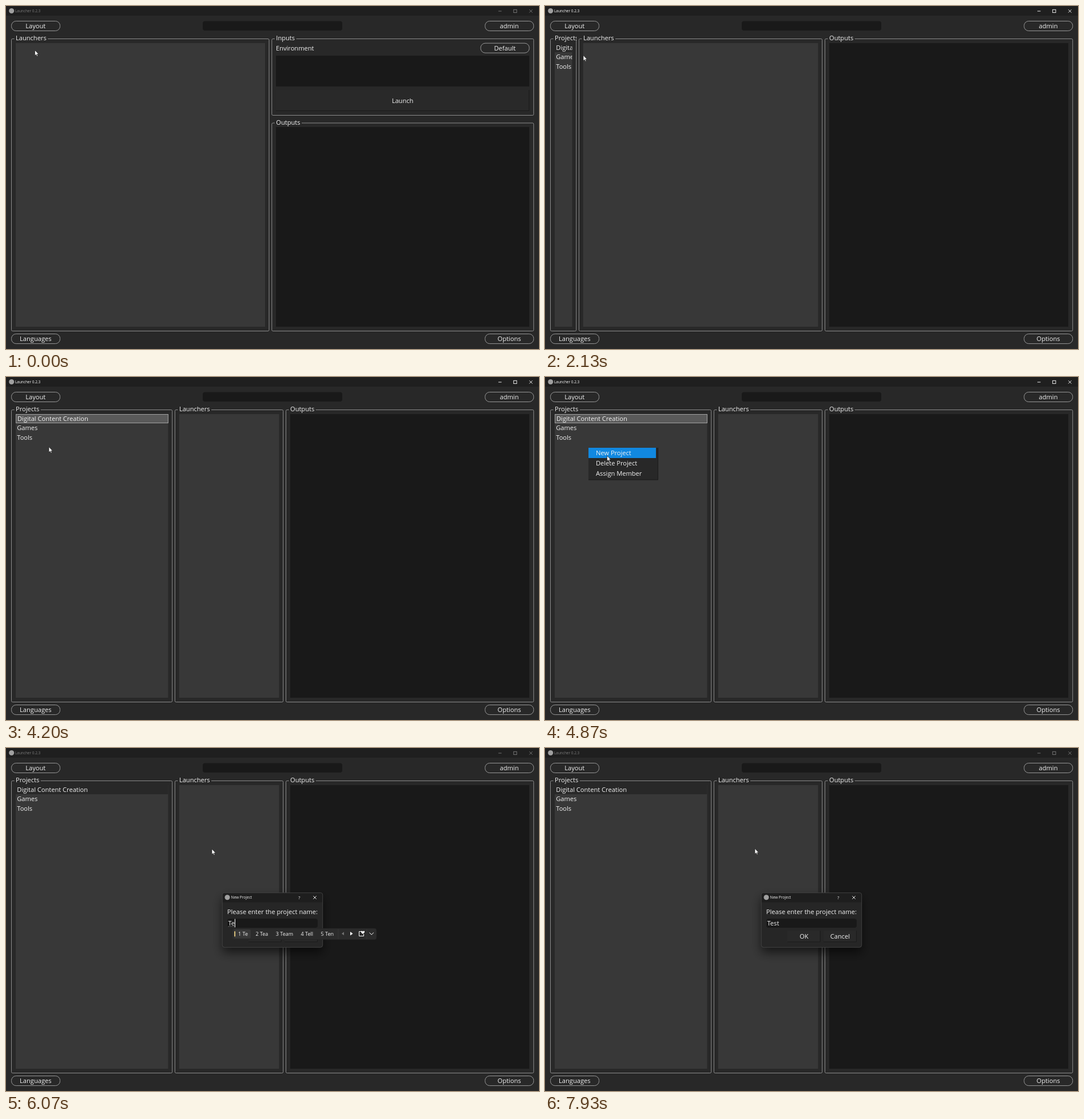
Write an HTML page that moves like this. It is 932 px wide and 601 px high and loops after 8000 ms.

```html
<!DOCTYPE html>
<html lang="en">
<head>
<meta charset="utf-8">
<title>Launcher</title>
<style>
html, body { margin: 0; width: 100%; height: 100%; overflow: hidden; background: #282828; }
svg { display: block; width: 932px; height: 601px; }
text { font-family: "Open Sans", "Noto Sans", sans-serif; white-space: pre; }
</style>
</head>
<body>
<svg id="stage" viewBox="0 0 932 601" xmlns="http://www.w3.org/2000/svg"></svg>
<script>
const LOOP = 8000, STEP = 1000 / 15;
const BG = '#282828', DARK = '#191919', LIST = '#383838', LINE = '#8c8c8c', INK = '#f2f2f2';
const stage = document.getElementById('stage');
const pen = document.createElement('canvas').getContext('2d');

function width(s, size) {
  pen.font = `${size}px "Open Sans", "Noto Sans", sans-serif`;
  return pen.measureText(s).width;
}

// Basic shapes
const box = (x1, y1, x2, y2, fill, more = '') =>
  `<rect x="${x1}" y="${y1}" width="${Math.max(0, x2 - x1)}" height="${y2 - y1}" fill="${fill}" ${more}/>`;
const path = (d, stroke, w = 1, more = '') =>
  `<path d="${d}" fill="none" stroke="${stroke}" stroke-width="${w}" ${more}/>`;
const label = (s, x, y, size = 11.1, fill = INK, more = '') =>
  `<text x="${x}" y="${y}" font-size="${size}" fill="${fill}" ${more}>${s}</text>`;
const centered = (s, x, y) => label(s, x, y, 11.1, INK, 'text-anchor="middle"');
const clipped = (id, x1, y1, x2, y2, body) =>
  `<clipPath id="${id}">${box(x1, y1, x2, y2, '#fff')}</clipPath><g clip-path="url(#${id})">${body}</g>`;

// Widgets
function pill(s, x, y) {
  return box(x, y, x + 85, y + 17, BG, `rx="8" stroke="#a4a4a4" stroke-width=".9"`) +
    centered(s, x + 42.3, y + 12.7);
}

function group(s, x1, y1, x2, y2) {
  const end = Math.min(x1 + 10 + width(s, 11.1), x2);
  const name = label(s, x1 + 7.5, y1 + 2.8);
  return box(x1, y1, x2, y2, 'none', `rx="2" stroke="${LINE}"`) +
    box(x1 + 5, y1 - 2, end, y1 + 2, BG) +
    clipped('g' + s, x1, y1 - 12, x2 + .5, y1 + 8, name);
}

function flatButton(s, x1, y1, x2, y2) {
  return box(x1, y1, x2, y2, '#292929') +
    path(`M${x1} ${y2 - .5}H${x2 - .5}V${y1}`, '#1b1b1b') +
    centered(s, (x1 + x2) / 2, (y1 + y2) / 2 + 4);
}

function menu(items, x, y, w, inset, hot) {
  const h = items.length * 18;
  let out = box(x, y, x + w, y + h + 2.5, BG) +
    path(`M${x} ${y + h + 2}H${x + w - .5}V${y}`, '#1b1b1b');
  items.forEach((s, i) => {
    const top = y + i * 18;
    if (i === hot) out += box(x, top, x + w - 4, top + 18, '#1188e0');
    out += label(s, x + inset, top + 13);
  });
  return out;
}

const cross = (x, y, c) => path(`M${x - 2.7} ${y - 2.7}l5.4 5.4m0 -5.4l-5.4 5.4`, c, .9);
const badge = (x, y, c) => `<circle cx="${x}" cy="${y}" r="4.5" fill="${c}"/>`;

function titleBar(active) {
  const c = active ? '#fff' : '#7c7c7c';
  return box(0, 0, 932, 17, '#1f1f1f') + badge(9.7, 8.5, '#a0a0a0') +
    label('Launcher 0.2.3', 16, 11, 6.45, c) +
    path('M861 9H866.5', c, .9) +
    box(887.7, 6.3, 893, 11.6, 'none', `stroke="${c}" stroke-width=".9"`) +
    cross(917.8, 8.9, c);
}

const common = () =>
  pill('Layout', 9.5, 26.5) + pill('admin', 837.7, 26.5) +
  pill('Languages', 9.5, 574.6) + pill('Options', 837.7, 574.6) +
  box(344, 26.5, 588, 43, DARK, 'rx="4"');

const simpleView = () =>
  group('Launchers', 9.5, 57.5, 460, 569.5) + box(17, 65, 453, 562, LIST) +
  group('Inputs', 464.8, 57.5, 922.7, 191.5) +
  label('Environment', 472, 78) + pill('Default', 830, 65.2) +
  box(472, 87, 915, 141, DARK) + flatButton('Launch', 472, 147, 915, 184) +
  group('Outputs', 464.8, 205, 922.7, 569.5) + box(472, 212, 915, 562, DARK);

function projectView(split, focus) {
  const edge = split - 9.5;
  const row = focus
    ? box(17.5, 65.5, edge, 80.5, '#5a5a5a', 'stroke="#a2a2a2"')
    : box(17, 65, edge, 81, BG);
  const items = label('Digital Content Creation', focus ? 20 : 19.3, 77) +
    label('Games', 19.3, 93.4) + label('Tools', 19.3, 109.6);
  return group('Projects', 9.5, 57.5, split - 2.3, 569.5) +
    box(17, 65, edge, 562, LIST) + row + clipped('rows', 17, 60, edge, 562, items) +
    group('Launchers', split + 2.4, 57.5, 484.7, 569.5) +
    box(split + 9.7, 65, 477.5, 562, LIST) +
    group('Outputs', 489.5, 57.5, 922.7, 569.5) + box(497, 65, 915, 562, DARK);
}

function dialog(typed, composing, caret, alpha) {
  const end = 388.5 + width(typed, 11.1);
  return `<g opacity="${alpha}"><g filter="url(#shade)">` +
    box(378.2, 253.7, 553.7, 349.3, BG, 'rx="4"') + '</g>' +
    path('M378.2 270.5V257.7q0 -4 4 -4H549.7q4 0 4 4V270.5z', 'none', 0, 'style="fill:#1e1e1e"') +
    box(378.2, 253.7, 553.7, 349.3, 'none', 'rx="4" stroke="#4a4a4a" stroke-width=".8"') +
    badge(387, 261.8, '#a0a0a0') + label('New Project', 393.6, 264.3, 6.55) +
    label('?', 511.3, 264.6, 7.5) + cross(540, 262, '#fff') +
    label('Please enter the project name:', 386.8, 291) +
    box(387, 299, 545, 315, DARK, 'rx="4"') + label(typed, 388.5, 311) +
    (composing ? path(`M388.5 313H${end}`, '#ddd', .8, 'stroke-dasharray="1 1"') : '') +
    (caret ? path(`M${end + .3} 299.5V314.3`, '#fff') : '') +
    flatButton('OK', 424, 320, 481.8, 340.3) + flatButton('Cancel', 487, 320, 545, 340.3) + '</g>';
}

function suggestions(typed, words) {
  const left = 388.5 + width(typed, 11.1) - 1;
  let x = left + 7, names = '', first = 0;
  words.forEach((w, i) => {
    const s = `${i + 1} ${w}`;
    names += label(s, x, 328.8, 9);
    x += width(s, 9);
    if (!i) first = x;
    x += 13.5;
  });
  x -= 5.5;
  return box(left - 4, 316, x + 67, 335.8, '#2b2b2b', 'rx="4" stroke="#222" stroke-width=".5"') +
    box(left, 318, first + 5, 333.5, '#383838', 'rx="2"') +
    box(left, 321, left + 2, 330.5, '#d9c07a', 'rx="1"') + names +
    path(`M${x} 317V335M${x + 50} 317V335`, '#383838', .8) +
    `<path d="M${x + 6} 325.3l4 -3v6z" fill="#747474"/>` +
    `<path d="M${x + 25.5} 325.3l-4.5 -3.3v6.6z" fill="#fff"/>` +
    path(`M${x + 40} 321.5h-3.5v8h8v-3.5`, '#fff', 1) +
    `<path d="M${x + 43} 326l-3 -3q-.6 -2.4 1.5 -2.4l1.5 1l1.5 -1q2.1 0 1.5 2.4z" fill="#fff"/>` +
    path(`M${x + 54.5} 323.5l3.7 3.6l3.7 -3.6`, '#fff', 1);
}

const arrow = (x, y) =>
  `<path transform="translate(${x} ${y})" d="M0 0V9.4L2.2 7.4L3.7 10.7L5.2 10L3.7 6.9H6.6Z"
    fill="#fff" stroke="#111" stroke-width=".6" stroke-linejoin="round"/>`;
const splitter = (x, y) =>
  `<g transform="translate(${x} ${y})"><path d="M-1.1 -5V5M1.1 -5V5M-2 0H-4M2 0H4" stroke="#fff"
    stroke-width="1.1"/><path d="M-6 0l2.8 -2.6v5.2zM6 0l-2.8 -2.6v5.2z" fill="#fff"/></g>`;

// Pointer stops: step, x, y
const route = [
  [0, 50.5, 77.5], [13, 335, 140], [14, 310, 130], [17, 130, 62], [20, 40, 39.5], [22, 40, 39.5],
  [27, 67, 86.5], [34, 67, 86.5], [44, 58, 168.5], [45, 57, 169.5], [51, 57, 169.5],
  [52, 82, 169.5], [54, 180, 170], [56, 270, 170], [57, 293, 170], [59, 293, 170],
  [63, 75, 122.5], [66, 75, 122.5], [70, 107.5, 138], [73, 108.5, 138], [74, 108.5, 138],
  [79, 360, 177], [117, 360, 177], [119, 367, 176.3]
];

function pointer(k) {
  const i = route.findIndex(p => p[0] >= k);
  if (i < 0) return route[route.length - 1].slice(1);
  if (i === 0) return route[0].slice(1);
  const [a, ax, ay] = route[i - 1], [b, bx, by] = route[i], u = (k - a) / (b - a);
  return [ax + (bx - ax) * u, ay + (by - ay) * u];
}

const within = (k, a, b) => k >= a && k < b;

function typing(k) {
  const test = ['Test', 'Tested', 'Testified', 'Testimony', 'Testing'];
  if (k < 83) return ['', null];
  if (k < 90) return ['T', ['T', 'The', 'To', 'This', 'That']];
  if (k < 96) return ['Te', ['Te', 'Tea', 'Team', 'Tell', 'Ten']];
  if (k < 99) return ['Tes', test];
  return ['Test', k < 102 ? test : null];
}

function scene(k) {
  const [x, y] = pointer(k);
  let out = '<defs><filter id="shade" x="-30%" y="-40%" width="160%" height="190%">' +
    '<feDropShadow dx="0" dy="9" stdDeviation="9" flood-color="#000" flood-opacity=".6"/></filter></defs>' +
    box(0, 0, 932, 601, BG) + titleBar(within(k, 6, 75)) + common();

  if (k < 32) out += simpleView();
  else {
    // The divider trails the pointer a little
    const split = k < 52 ? 57 : k > 58 ? 293 : pointer(k - .7)[0];
    out += projectView(split, within(k, 63, 75));
  }
  if (within(k, 22, 32)) {
    out += menu(['Launchers', 'Inputs', 'Projects'], 9.5, 45, 86, 13, Math.floor((y - 45) / 18));
  }
  if (within(k, 66, 75)) {
    out += menu(['New Project', 'Delete Project', 'Assign Member'], 76, 124, 122, 13,
      Math.floor((y - 124) / 18));
  }
  if (k >= 76) {
    const [typed, words] = typing(k);
    const caret = k < 110 || k === 118;
    out += dialog(typed, !!words, caret, Math.min(1, (k - 75) / 3));
    if (words) out += suggestions(typed, words);
  }
  return out + (within(k, 45, 60) ? splitter : arrow)(x, y);
}

let start = null, last = -1;
function tick(now) {
  if (start === null) start = now;
  const t = (now - start) % LOOP;
  const k = Math.min(119, Math.floor((t + 5) / STEP));
  if (k !== last) stage.innerHTML = scene(last = k);
  requestAnimationFrame(tick);
}
stage.innerHTML = scene(0);
requestAnimationFrame(tick);
</script>
</body>
</html>
```
